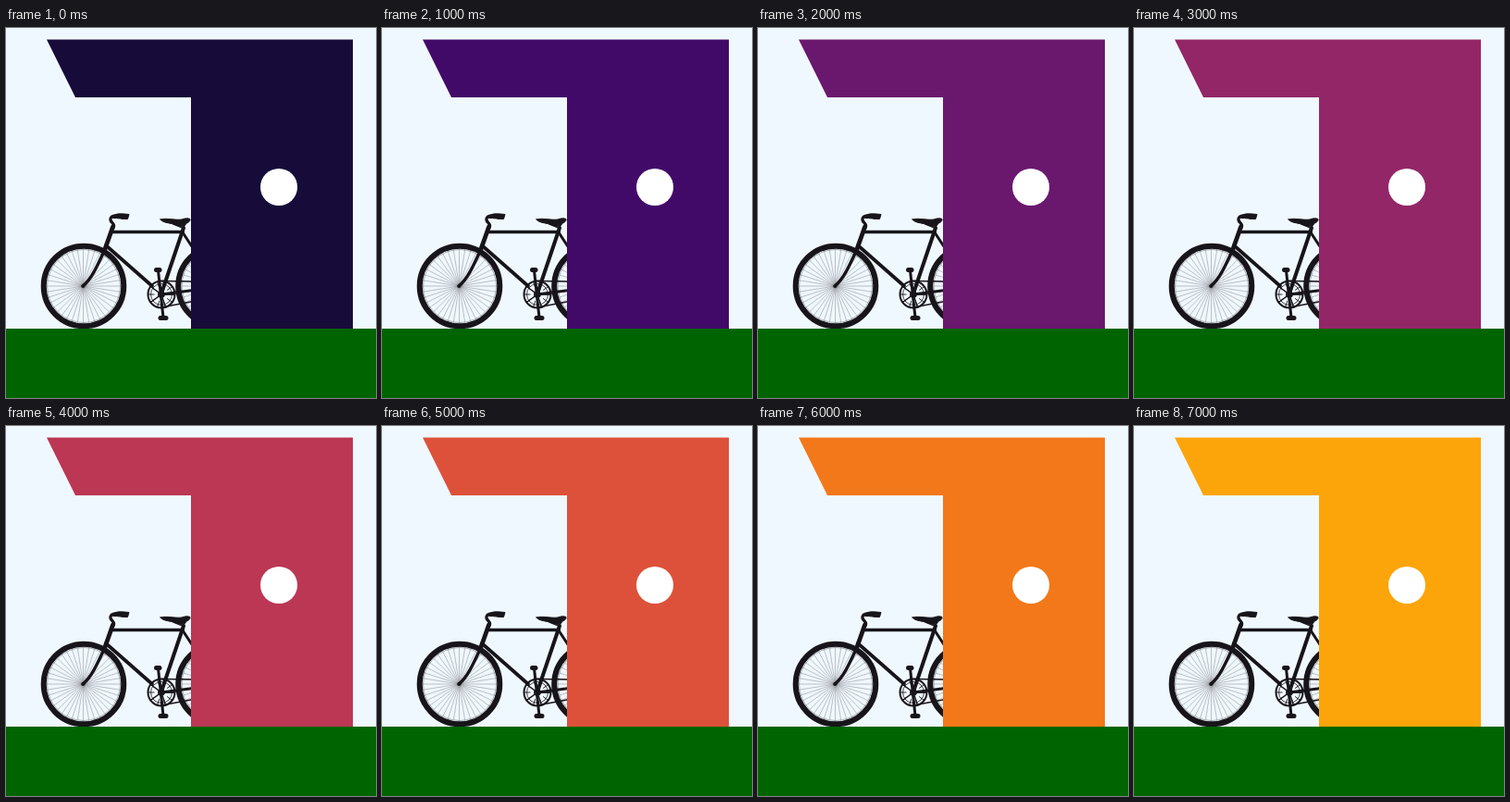
Recreate the animation shown at these times as an HTML page. Size 400x400 px, loop 8000 ms.

```html
<!DOCTYPE html>
<html lang="en">
<head>
<meta charset="utf-8">
<title>Bike shed</title>
<style>
  html, body { margin: 0; width: 100%; height: 100%; overflow: hidden; background: #f0f8ff; }
  svg { display: block; width: 100vw; height: 100vh; }
</style>
</head>
<body>
<svg viewBox="0 0 400 400">
  <rect width="400" height="400" fill="#f0f8ff"/>
  <g fill="none" stroke="#17151a" stroke-linecap="round" stroke-linejoin="round">
    <g id="wheels"></g>
    <!-- frame -->
    <path d="M83 279C92 272 98 259 108 237" stroke-width="3.4"/>
    <path d="M107 239L115.500 215" stroke-width="4.800"/>
    <path d="M114 220.500H191M108 235L158 279" stroke-width="3.700"/>
    <path d="M192 216L168 287" stroke-width="4"/>
    <path d="M191 221L229 279M168 288L229 280" stroke-width="3"/>
    <!-- handlebar -->
    <path d="M116 216C119 211 112 211 113 206C114 203 117 203 121 203" stroke-width="3.200"/>
    <path d="M117 202C122 200 127 201 133 201.500L131.500 206.500C126 207 121 205 116 205.500Z" fill="#17151a" stroke-width="1"/>
    <!-- saddle -->
    <path d="M167 207C174 205 182 208 190 207C194 205.500 197 205.500 199 206.500C199.500 210 196 210 193 213C190 216 185 213 179 211.500C174 210.500 169 210 167 207Z" fill="#17151a" stroke-width="1"/>
    <path d="M181 212L191 216L194 212" stroke-width="1.500"/>
    <!-- chain and crank -->
    <path d="M168 273.500L200 274M168 302L200 296" stroke-width="1.500"/>
    <circle cx="168" cy="288" r="14.500" stroke-width="2"/>
    <circle cx="168" cy="288" r="11.500" stroke-width=".8"/>
    <g id="ring" stroke-width="1.300"></g>
    <circle cx="168" cy="288" r="3.600" fill="#17151a"/>
    <path d="M164.500 262L170 313" stroke-width="3"/>
    <path d="M162.500 261.500H166M167 313.500H173" stroke-width="5"/>
  </g>
  <path id="shed" d="M44 12.500H375V325H200V75H75Z" fill="#160b39"/>
  <circle cx="295" cy="172" r="20" fill="#fff"/>
  <rect y="325" width="400" height="75" fill="#006400"/>
</svg>
<script>
const COLORS = ['#160b39', '#420a68', '#6a176e', '#932667', '#bc3754', '#dd513a', '#f37819', '#fca50a'];
const STEP = 1000;
const shed = document.getElementById('shed');

// Lines between two radii, evenly spread around a centre.
function rays(cx, cy, inner, outer, count) {
  let d = '';
  for (let i = 0; i < count; i++) {
    const a = 2 * Math.PI * i / count, c = Math.cos(a), s = Math.sin(a);
    d += `M${cx + inner * c} ${cy + inner * s}L${cx + outer * c} ${cy + outer * s}`;
  }
  return d;
}

function wheel(cx, cy) {
  return `<path d="${rays(cx - .5, cy, 2, 41, 40)}" stroke="#77777c" stroke-width=".45"/>
    <circle cx="${cx}" cy="${cy}" r="43.3" stroke-width="6"/>
    <circle cx="${cx}" cy="${cy}" r="39.500" stroke="#8b8b90" stroke-width=".7"/>
    <circle cx="${cx - .5}" cy="${cy}" r="2" fill="#17151a" stroke="none"/>`;
}

document.getElementById('wheels').innerHTML = wheel(84, 279) + wheel(229.5, 279);
document.getElementById('ring').innerHTML =
  `<path d="${rays(168, 288, 4, 14, 5)}"/><path d="${rays(168, 288, 8, 14, 10)}" stroke-width=".9"/>`;

function draw(t) {
  shed.setAttribute('fill', COLORS[Math.floor(t / STEP) % COLORS.length]);
}

const start = performance.now();
function tick() {
  draw(performance.now() - start);
  requestAnimationFrame(tick);
}
tick();
</script>
</body>
</html>
```
